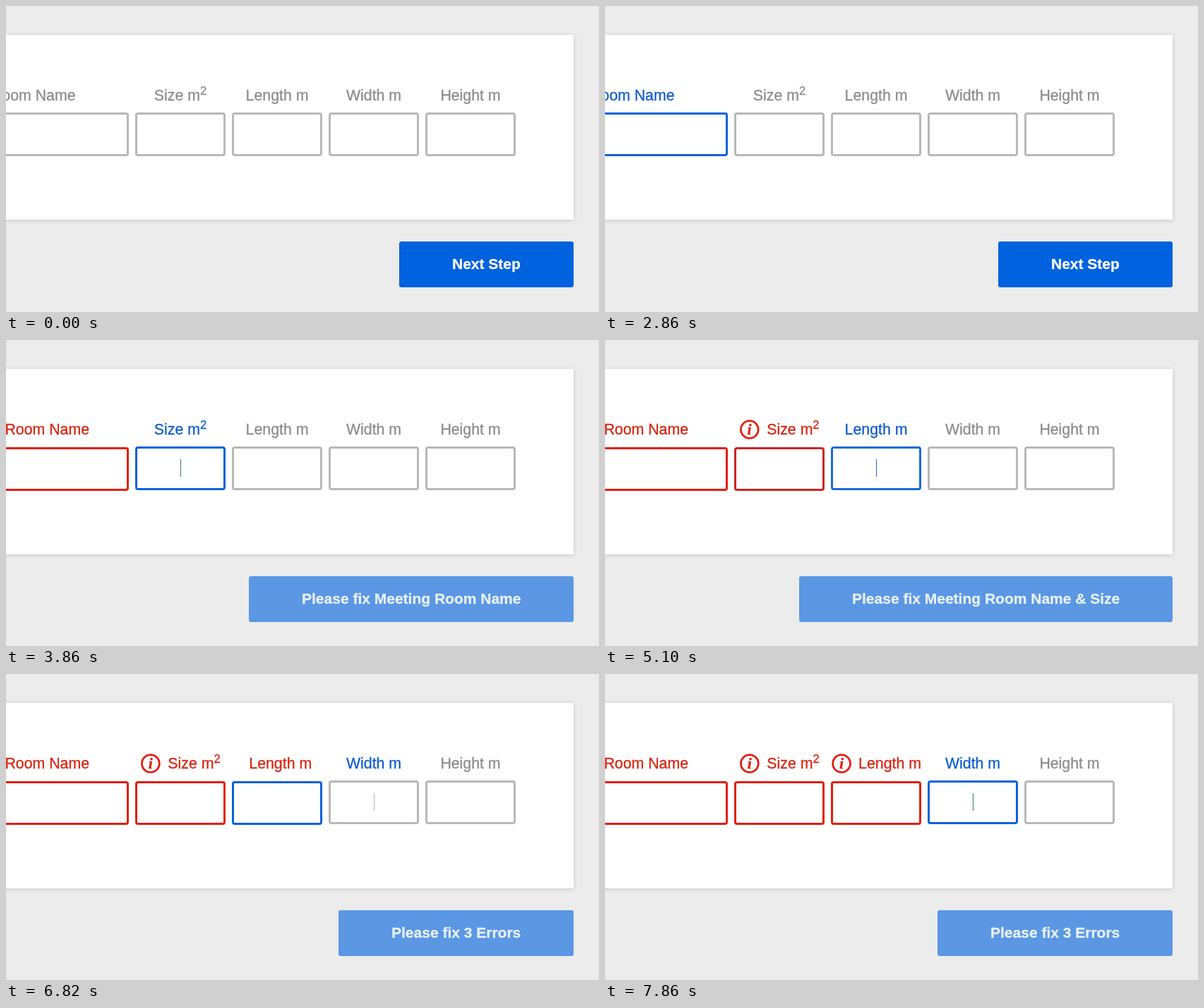
An HTML page with a canvas for the animation above (8 s loop, 840x434 px).

```html
<!DOCTYPE html>
<html lang="en">
<head>
<meta charset="utf-8">
<style>
  html, body { margin: 0; width: 840px; height: 434px; overflow: hidden; background: #ececec; }
  canvas { display: block; }
</style>
</head>
<body>
<canvas id="stage" width="840" height="434"></canvas>
<script>
const ctx = document.getElementById('stage').getContext('2d');
const LOOP = 8000, FADE = 180;
const SANS = '"Liberation Sans", Arial, sans-serif';
const GREY = [184, 184, 184], BLUE = [4, 98, 220], RED = [228, 30, 10];
const LABEL_GREY = '#8b8c8c', LABEL_BLUE = '#0e5cd0', LABEL_RED = '#d9230f';

// Each field gains focus at its time and fails when the next one is focused.
const fields = [
  { label: 'Meeting Room Name', x: -300, w: 474, focus: 500 },
  { label: 'Size m', sup: '2', x: 183, w: 128, focus: 2900, caret: 247, blinks: [3380, 3860, 4300, 4820] },
  { label: 'Length m', x: 320, w: 128, focus: 4980, caret: 384, blinks: [5460, 5980, 6460] },
  { label: 'Width m', x: 457, w: 128, focus: 6820, caret: 521, blinks: [7340, 7860] },
  { label: 'Height m', x: 594, w: 128, focus: Infinity }
];
const messages = ['Next Step', 'Please fix Meeting Room Name', 'Please fix Meeting Room Name & Size', 'Please fix 3 Errors'];

const progress = (t, start, length = FADE) => {
  const p = Math.min(1, Math.max(0, (t - start) / length));
  return 1 - (1 - p) ** 2;
};
const mix = (a, b, p) => `rgb(${a.map((v, i) => Math.round(v + (b[i] - v) * p))})`;

function text(string, x, y, font, color, stroke = 0.3) {
  ctx.font = font;
  ctx.fillStyle = ctx.strokeStyle = color;
  ctx.lineWidth = stroke;
  ctx.fillText(string, x, y);
  ctx.strokeText(string, x, y);
  return ctx.measureText(string).width;
}

function box(x, y, w, h, r) {
  ctx.beginPath();
  ctx.roundRect(x, y, w, h, r);
}

function infoIcon(x, y, p) {
  ctx.save();
  ctx.globalAlpha = p;
  ctx.translate(x, y);
  ctx.scale(p, p);
  ctx.beginPath();
  ctx.arc(0, 0, 12.4, 0, 7);
  ctx.strokeStyle = mix(RED, RED, 0);
  ctx.lineWidth = 2.8;
  ctx.stroke();
  text('i', -3.2, 7.2, 'italic bold 22px "Liberation Serif", serif', mix(RED, RED, 0));
  ctx.restore();
}

function drawLabel(field, t, failAt) {
  const failed = t >= failAt;
  const color = failed ? LABEL_RED : t >= field.focus ? LABEL_BLUE : LABEL_GREY;
  const font = '21.3px ' + SANS, supFont = '16.5px ' + SANS;
  const p = progress(t, failAt, 130);
  const shift = failed ? 4.5 + 15 * p : 0;
  ctx.font = font;
  const width = ctx.measureText(field.label).width + (field.sup ? 9.2 : 0);
  const center = field.x + field.w / 2;
  const left = (field.x < 0 ? 98.5 - width : center - width / 2) + shift;
  const end = left + text(field.label, left, 134, font, color);
  if (field.sup) text(field.sup, end, 126, supFont, color);
  if (failed && field.x > 0) infoIcon(left - 24.5 + (field.sup ? 0 : 0.5), 127, p);
}

function drawField(field, t, failAt) {
  const failed = t >= failAt;
  const color = failed ? mix(BLUE, RED, progress(t, failAt)) : mix(GREY, BLUE, progress(t, field.focus));
  box(field.x + 1.5, 152.5 + failed, field.w - 3, 59, 2.5);
  ctx.strokeStyle = color;
  ctx.lineWidth = 3;
  ctx.stroke();

  if (!field.caret || failed || t < field.focus) return;
  const toggles = field.blinks.filter(time => t >= time).length;
  if (toggles % 2) return;
  ctx.fillStyle = toggles ? '#2f7c74' : color;
  ctx.fillRect(field.caret, 169, 1, 25);
}

function drawButton(t, errors) {
  const font = 'bold 21px ' + SANS, message = messages[errors];
  ctx.font = font;
  const width = Math.round(ctx.measureText(message).width) + 150;
  const left = 804 - width, top = 334 + (errors > 0);
  ctx.globalAlpha = 1 - 0.39 * progress(t, fields[1].focus);
  box(left, top, width, 65, 3);
  ctx.fillStyle = '#0062de';
  ctx.fill();
  ctx.globalAlpha = 1 - 0.15 * progress(t, fields[1].focus);
  text(message, left + 75, top + 39, font, '#fff');
  ctx.globalAlpha = 1;
}

function draw(now) {
  const t = now % LOOP;
  const errors = fields.slice(1).filter(field => t >= field.focus).length;
  ctx.fillStyle = '#ececec';
  ctx.fillRect(0, 0, 840, 434);

  ctx.save();
  ctx.shadowColor = 'rgba(0, 0, 0, .16)';
  ctx.shadowBlur = 6;
  ctx.shadowOffsetY = 1;
  ctx.fillStyle = '#fff';
  ctx.fillRect(-50, 41, 854, 262 + (errors > 0));
  ctx.restore();

  fields.forEach((field, i) => {
    const failAt = i < 4 ? fields[i + 1].focus : Infinity;
    drawLabel(field, t, failAt);
    drawField(field, t, failAt);
  });
  drawButton(t, errors);
}

const start = performance.now();
function frame() {
  draw(performance.now() - start);
  requestAnimationFrame(frame);
}
frame();
</script>
</body>
</html>
```
